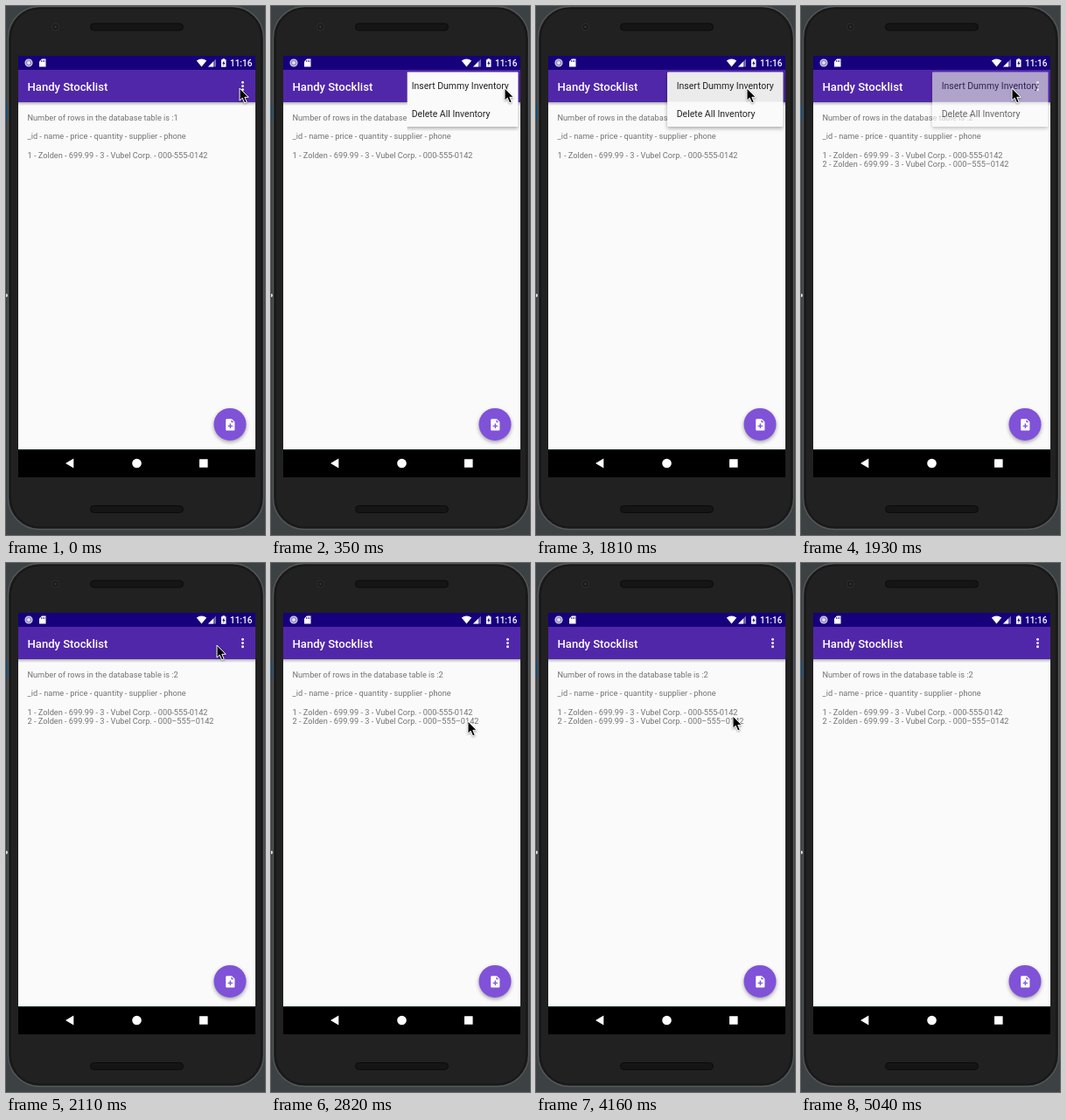
An HTML page for the animation above (5.6 s loop, 296 by 605 pixels).

```html
<!DOCTYPE html>
<html lang="en">
<head>
<meta charset="utf-8">
<title>Inventory app</title>
<style>
  html, body { margin: 0; width: 100%; height: 100%; overflow: hidden; background: #3c4144; }
  svg { display: block; width: 296px; height: 605px; }
  text { font-family: Roboto, "Open Sans", sans-serif; white-space: pre; }
  .body { font-size: 9.2px; fill: #737373; }
  .item { font-size: 10.5px; fill: #222; }
  .title { font-size: 13.1px; font-weight: 500; fill: #fff; }
  .clock { font-size: 10px; font-weight: 500; fill: #fff; }
  .card { filter: drop-shadow(0 2px 2px rgba(0, 0, 0, .32)); }
  .fab { filter: drop-shadow(0 2px 2px rgba(0, 0, 0, .35)); }
  .arrow { filter: drop-shadow(0 1px 1px rgba(0, 0, 0, .35)); }
</style>
</head>
<body>
<svg viewBox="0 0 296 605">
  <defs>
    <linearGradient id="shade" x2="0" y2="1">
      <stop stop-color="#000" stop-opacity=".28"/>
      <stop offset="1" stop-color="#000" stop-opacity="0"/>
    </linearGradient>
    <clipPath id="reveal"><rect id="window" y="70" height="80"/></clipPath>
  </defs>

  <!-- Phone -->
  <rect width="296" height="605" fill="#3c4144"/>
  <rect y="112" width="2" height="19" fill="#164a70"/>
  <rect x="2.5" y=".5" width="292" height="598" rx="36" fill="#1b1b1b" stroke="#57595a" stroke-width="1.3"/>
  <rect x="5.5" y="3" width="286" height="593" rx="33" fill="#212121" stroke="#171717"/>
  <circle cx="0" cy="331" r="2" fill="#ddd"/>
  <circle cx="56.5" cy="24" r="4" fill="#191919" stroke="#303030"/>
  <circle cx="56.5" cy="24" r="1.4" fill="#343434"/>
  <g fill="#151515" stroke="#0b0b0b">
    <rect x="96.5" y="20" width="106" height="8" rx="4"/>
    <rect x="96.5" y="571.5" width="106" height="8" rx="4"/>
  </g>

  <!-- Screen -->
  <rect x="14" y="57" width="271" height="482" fill="#fafafa"/>
  <rect x="14" y="110" width="271" height="4" fill="url(#shade)"/>
  <rect x="14" y="57" width="271" height="16" fill="#17007c"/>
  <rect x="14" y="73" width="271" height="37" fill="#5127a9"/>

  <!-- Status bar -->
  <circle cx="26" cy="65" r="3.9" fill="#8f86bd" stroke="#d3cfe6" stroke-width="1.3"/>
  <circle cx="26" cy="65" r="2" fill="#e2dff0"/>
  <path d="M38 63.5 41 60.5H45.5V69.5H38Z" fill="#fff"/>
  <path d="M40.5 62v2M42.3 62v2M44 62v2" stroke="#17007c" stroke-width=".7"/>
  <path d="M217.8 62.6Q223.5 58.6 229.2 62.6L223.5 69.6Z" fill="#fff"/>
  <path d="M231 69.5 240 60.5V69.5Z" fill="#7467af"/>
  <path d="M231 69.5 237 63.5V69.5Z" fill="#fff"/>
  <path d="M246 61.3h1.5v-1h2.5v1h1.5v8.4H246Z" fill="#fff"/>
  <path d="M249.3 62.4 247.2 66h1.3v2.6l1.9-3.5h-1.1Z" fill="#17007c"/>
  <text class="clock" x="256" y="68.8">11:16</text>

  <!-- App -->
  <text class="title" x="24.5" y="96.5">Handy Stocklist</text>
  <g fill="#fff">
    <circle cx="270.5" cy="87.4" r="1.45"/>
    <circle cx="270.5" cy="91.6" r="1.45"/>
    <circle cx="270.5" cy="95.8" r="1.45"/>
  </g>
  <g class="body">
    <text id="count" x="24.5" y="130.5"></text>
    <text x="24.5" y="152">_id - name - price - quantity - supplier - phone</text>
    <text x="24.5" y="173.5">1 - Zolden - 699.99 - 3 - Vubel Corp. - 000-555-0142</text>
    <text id="added" x="24.5" y="184.3">2 - Zolden - 699.99 - 3 - Vubel Corp. - 000–555–0142</text>
  </g>
  <circle class="fab" cx="256" cy="478.4" r="18.5" fill="#8052d8"/>
  <path d="M252.7 472.2H258L261.4 475.6V484.6Q261.4 485.6 260.4 485.6H252.2Q251.2 485.6 251.2 484.6V473.2Q251.2 472.2 252.7 472.2Z" fill="#fff"/>
  <path d="M256.3 477.6v5.4M253.6 480.3h5.4" stroke="#8052d8" stroke-width="1.3"/>
  <path d="M257.4 473.2V476.2H260.4Z" fill="#8052d8"/>

  <!-- Navigation bar -->
  <rect x="14" y="507" width="271" height="32" fill="#000"/>
  <rect x="14" y="507" width="271" height=".8" fill="#16301f"/>
  <g fill="#fff">
    <path d="M68 523 77.3 517.6V528.6Z"/>
    <circle cx="149.5" cy="523" r="5.3"/>
    <rect x="221" y="518.2" width="9.6" height="9.6" rx=".5"/>
  </g>

  <!-- Overflow menu -->
  <g clip-path="url(#reveal)">
    <g id="menu">
      <rect class="card" x="150" y="75.5" width="132.5" height="62.5" rx="1" fill="#fafafa"/>
      <rect id="press" x="150" y="75.5" width="132.5" height="34" fill="#000"/>
      <text class="item" x="160.7" y="95.2">Insert Dummy Inventory</text>
      <text class="item" x="160.7" y="127">Delete All Inventory</text>
    </g>
  </g>

  <path id="cursor" class="arrow" d="M0 0V14.2L3.2 11.2 5.7 16.9 8.2 15.8 5.8 10.3H10.2Z" fill="#000" stroke="#fff" stroke-width="1"/>
</svg>

<script>
const LOOP = 5600;
const el = id => document.getElementById(id);
const [cursor, menu, press, win, count, added] =
  ["cursor", "menu", "press", "window", "count", "added"].map(el);

// Each move: start, end, number of steps, points as [progress, x, y]
const moves = [
  [700, 1040, 7, [[0, 267, 94], [.3, 262, 95], [.7, 246, 95], [1, 241, 94]]],
  [2460, 2990, 10, [[0, 241, 94], [.2, 240, 108], [.5, 233, 158], [.7, 225, 181], [.85, 196, 198], [1, 158, 206]]],
  [3050, 3580, 10, [[0, 158, 206], [.2, 121, 206], [.4, 76, 203], [.6, 44, 197], [.7, 40, 193], [.85, 52, 187], [1, 78, 184]]],
  [3630, 4160, 10, [[0, 78, 184], [.2, 92, 181], [.5, 145, 176], [.8, 204, 174], [1, 225, 175]]],
  [4220, 4510, 6, [[0, 225, 175], [.17, 226, 196], [.5, 234, 310], [.83, 244, 426], [1, 246, 442]]],
  [4810, 5040, 5, [[0, 246, 442], [.2, 249, 456], [.4, 254, 492], [.6, 261, 540], [.8, 266, 588], [1, 268, 625]]]
];

const opening = { start: 180, end: 410, reveal: [.25, .5, .75, .93, 1], alpha: [.35, .65, .9, 1, 1] };
const closing = { start: 1810, end: 2110, alpha: [1, .95, .68, .36, .12, 0], press: [.06, .12, .12, .12, .12, 0] };

// Index of the step showing at time t, or -1 before the first
function stepAt(t, start, end, n) {
  if (t < start) return -1;
  return Math.min(n - 1, Math.floor((t - start) / (end - start) * (n - 1) + .03));
}

function along(points, p) {
  const i = Math.max(1, points.findIndex(q => q[0] >= p - 1e-6));
  const a = points[i - 1], b = points[i];
  const k = (p - a[0]) / (b[0] - a[0]);
  return [1, 2].map(j => Math.round(a[j] + (b[j] - a[j]) * k));
}

function cursorAt(t) {
  const [start, end, n, points] = moves.filter(m => t >= m[0]).pop() || moves[0];
  return along(points, (stepAt(t, start, end, n) + 1) / n);
}

function draw(t) {
  const open = stepAt(t, opening.start, opening.end, 5);
  const close = stepAt(t, closing.start, closing.end, 6);
  const shown = open < 0 ? 0 : opening.reveal[open];
  const alpha = close >= 0 ? closing.alpha[close] : open < 0 ? 0 : opening.alpha[open];

  win.setAttribute("x", 285 - 139 * shown);
  win.setAttribute("width", 139 * shown);
  win.setAttribute("height", 5 + 73 * shown);
  menu.style.opacity = alpha;
  press.style.opacity = close < 0 ? 0 : closing.press[close];

  const inserted = close >= 1;
  count.textContent = "Number of rows in the database table is :" + (inserted ? 2 : 1);
  added.style.opacity = inserted ? 1 : 0;

  const [x, y] = cursorAt(t);
  cursor.setAttribute("transform", `translate(${x} ${y})`);
}

const born = performance.now();
function tick() {
  draw((performance.now() - born) % LOOP);
  requestAnimationFrame(tick);
}
tick();
</script>
</body>
</html>
```
